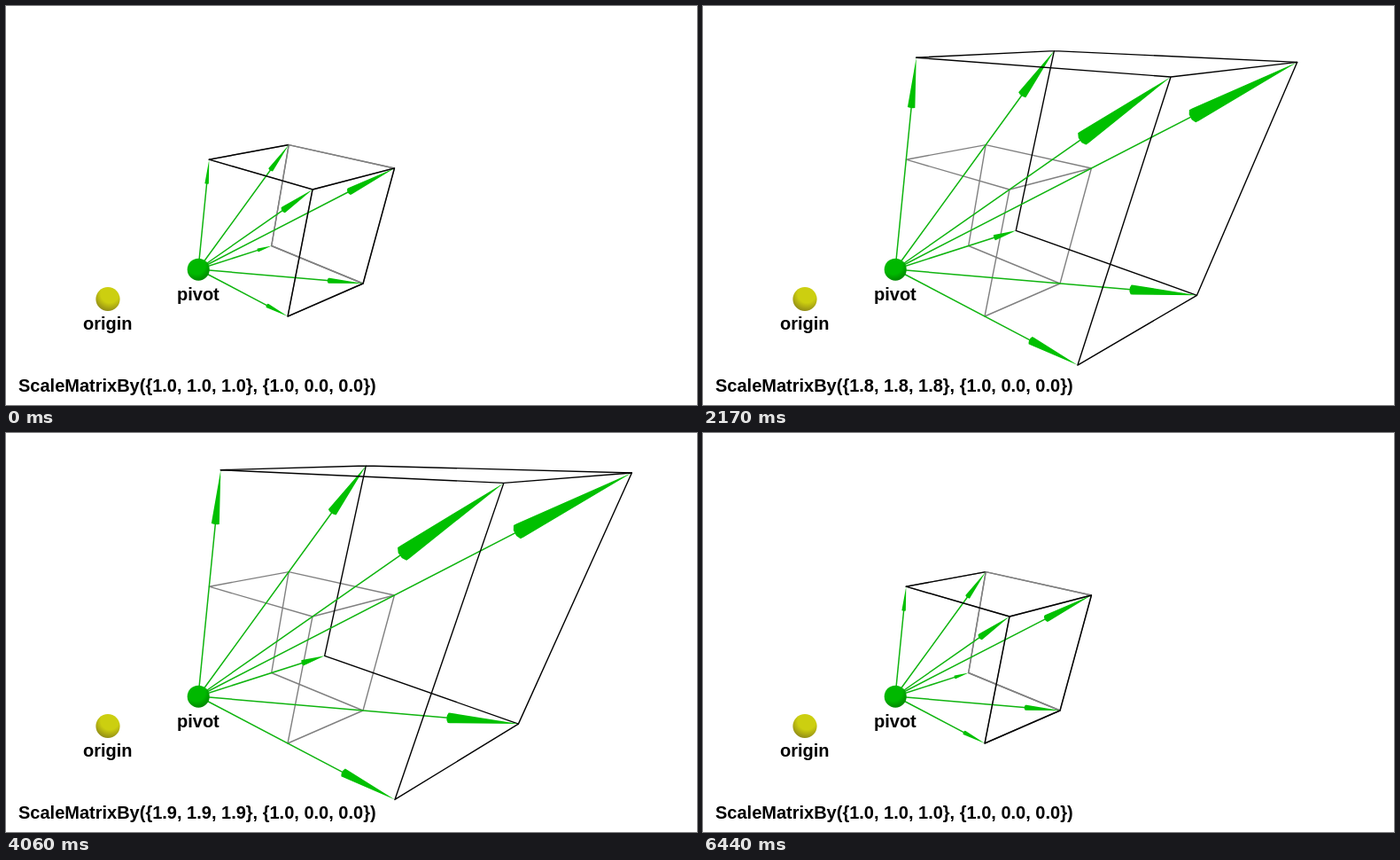
These frames come from a looping animation (780 px wide and 450 px high, 6510 ms). An HTML page:

```html
<!DOCTYPE html>
<html lang="en">
<head>
<meta charset="utf-8">
<title>Scaling about a pivot</title>
<style>
  html, body { margin: 0; width: 100%; height: 100%; overflow: hidden; background: #fff; }
  svg { display: block; }
  text { font: bold 20px "Liberation Sans", Arial, sans-serif; fill: #000; }
  path { fill: none; stroke-linecap: round; }
  .ghost { stroke: #808080; stroke-width: 1.4; }
  .edge { stroke: #000; stroke-width: 1.4; }
  #shafts { stroke: #0fb40f; stroke-width: 1.5; }
  #cones { fill: #00c000; }
</style>
</head>
<body>
<svg width="780" height="450" viewBox="0 0 780 450">
  <defs>
    <radialGradient id="green" cx=".4" cy=".3" r=".75">
      <stop offset=".55" stop-color="#00b800"/>
      <stop offset="1" stop-color="#008200"/>
    </radialGradient>
    <radialGradient id="yellow" cx=".58" cy=".28" r=".75">
      <stop offset=".5" stop-color="#cccf10"/>
      <stop offset=".72" stop-color="#b2b012"/>
      <stop offset="1" stop-color="#8c8818"/>
    </radialGradient>
  </defs>
  <path id="ghost" class="ghost"/>
  <path id="back" class="edge"/>
  <path id="ghostTop" class="ghost"/>
  <path id="shafts"/>
  <path id="cones"/>
  <path id="front" class="edge"/>
  <circle cx="217.2" cy="297.2" r="12.5" fill="url(#green)"/>
  <circle cx="115" cy="330.5" r="13.6" fill="url(#yellow)"/>
  <text x="193" y="332">pivot</text>
  <text x="87" y="365">origin</text>
  <text id="call" x="14" y="435"></text>
</svg>
<script>
const PIVOT = [217, 297];

// x, y at scale 1; w: depth slope; len: arrow length in box edges; round: cone base flattening
const corner = (x, y, w, len, round) => ({ x, y, w, len: Math.sqrt(len), round });
const CORNERS = {
  A: corner(229.3, 173.2, -0.1043, 1, 0.2),
  B: corner(319.2, 156.6, 0.0026, 2, 0.35),
  C: corner(346, 207, -0.263, 2, 0.55),
  D: corner(438.4, 183, -0.1575, 3, 0.55),
  E: corner(299.7, 270.5, 0.0976, 1, 0.3),
  F: corner(403, 313, -0.0494, 2, 0.5),
  G: corner(318, 350, -0.1534, 1, 0.45)
};
const REAR = ["BD", "BE", "EF"];
const BACK = [...REAR, "AB"];
const FRONT = ["AC", "CD", "CG", "FG", "DF"];

const LOOP = 6510, STEPS = 94, LEAD = 2.4 / 360;
// [step, ms] marks of the uneven playback clock
const CLOCK = [[0, 0], [61, 4270], [70, 4890], [71, 4960], [76, 5290], [77, 5370],
  [80, 5570], [81, 5650], [90, 6260], [91, 6320], [93, 6440], [STEPS, LOOP]];

const $ = id => document.getElementById(id);
const draw = (id, d) => $(id).setAttribute("d", d);
const pt = ([x, y]) => x.toFixed(2) + " " + y.toFixed(2);

// Perspective position of a corner scaled by s about the pivot
function project(c, s) {
  const k = s * (1 + c.w) / (1 + c.w * s);
  return [PIVOT[0] + (c.x - PIVOT[0]) * k, PIVOT[1] + (c.y - PIVOT[1]) * k];
}

const edges = (list, s) => list.map(([a, b]) =>
  `M${pt(project(CORNERS[a], s))}L${pt(project(CORNERS[b], s))}`).join("");

function cone(c, s) {
  const tip = project(c, s), base = project(c, s * 0.8);
  const dx = tip[0] - base[0], dy = tip[1] - base[1], len = Math.hypot(dx, dy);
  const ux = dx / len, uy = dy / len;
  const r = 2.2 * s * c.len / (1 + c.w * s * 0.8);
  const pts = [tip];
  for (let i = 0; i < 6; i++) {
    const a = (i - 0.5) * Math.PI / 4;
    const side = r * Math.cos(a), rear = r * c.round * Math.sin(a);
    pts.push([base[0] - uy * side - ux * rear, base[1] + ux * side - uy * rear]);
  }
  return "M" + pts.map(pt).join("L") + "Z";
}

function stepAt(t) {
  const i = CLOCK.findIndex(m => t < m[1]);
  const [n0, t0] = CLOCK[i - 1], [n1, t1] = CLOCK[i];
  return Math.floor(n0 + (t - t0) / (t1 - t0) * (n1 - n0) + 1e-6);
}

function render(t) {
  const s = 1.5 - 0.5 * Math.cos(2 * Math.PI * (stepAt(t) / STEPS + LEAD));
  const all = Object.values(CORNERS);
  draw("back", edges(BACK, s));
  draw("front", edges(FRONT, s));
  // Rear edges of the fixed box win while both boxes coincide
  draw("ghostTop", s < 1.003 ? edges(REAR, 1) : "");
  draw("shafts", all.map(c => `M${pt(PIVOT)}L${pt(project(c, s * 0.82))}`).join(""));
  draw("cones", all.map(c => cone(c, s)).join(""));
  const v = s.toFixed(1);
  $("call").textContent = `ScaleMatrixBy({${v}, ${v}, ${v}}, {1.0, 0.0, 0.0})`;
  $("back").style.display = "";
  if (s < 1.003) draw("back", edges(["AB"], s));
}

draw("ghost", edges([...BACK, ...FRONT], 1));
const start = performance.now();
function tick() {
  render((performance.now() - start) % LOOP);
  requestAnimationFrame(tick);
}
tick();
</script>
</body>
</html>
```
